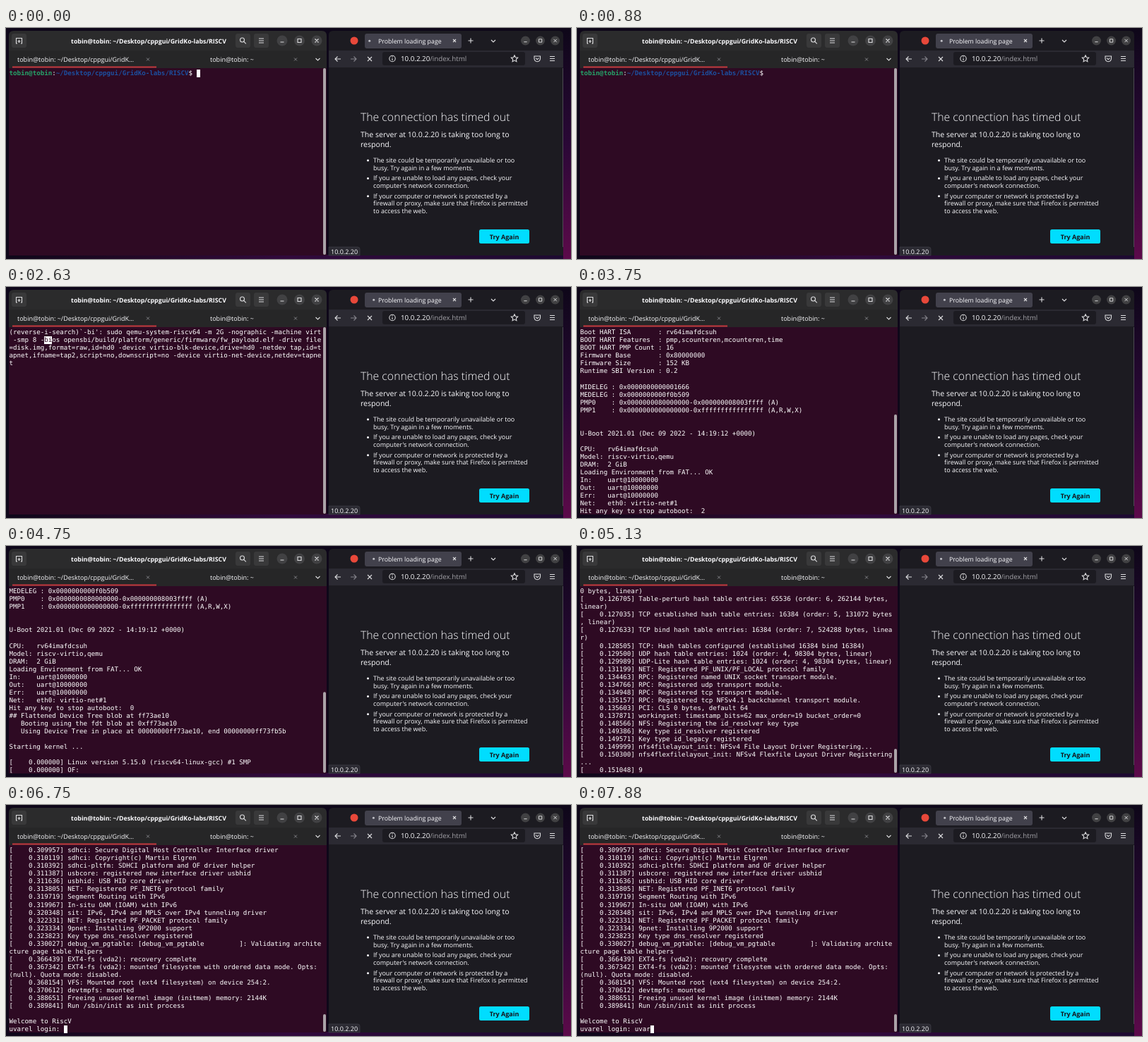
An HTML page for the animation above (8000 ms loop, 800 by 328 pixels).

```html
<!DOCTYPE html>
<html lang="en">
<head>
<meta charset="utf-8">
<title>Booting in a terminal</title>
<style>
html, body { margin: 0; width: 100%; height: 100%; overflow: hidden; background: #0e0719; }
svg, pre { position: absolute; text-rendering: geometricPrecision; }
svg { left: 0; top: 0; }
text { font: 450 9px "Open Sans", "Noto Sans", sans-serif; fill: #fbfbfe; white-space: pre; }
.b { font-weight: 700; }
.line { fill: none; stroke: #dedee0; stroke-width: 1.1; }
.dim { stroke: #8c8c90; stroke-width: .9; }
pre {
  left: 4.5px; top: 59.2px; margin: 0; color: #fff;
  font: 9.19px/11.05px "DejaVu Sans Mono", "Noto Sans Mono", monospace;
}
pre i { font-style: normal; color: #300a24; background: #fff; }
pre b { color: #26a269; }
pre b + b { color: #1d4f9f; }
</style>
</head>
<body>
<svg width="800" height="328" viewBox="0 0 800 328">
  <defs>
    <linearGradient id="floor">
      <stop offset="0" stop-color="#0e0719"/><stop offset=".25" stop-color="#240828"/>
      <stop offset=".5" stop-color="#310a3c"/><stop offset="1" stop-color="#1c0a30"/>
    </linearGradient>
    <linearGradient id="side" x2="0" y2="1">
      <stop offset="0" stop-color="#0e0719"/><stop offset=".5" stop-color="#2a0836"/>
      <stop offset="1" stop-color="#5c0a4a"/>
    </linearGradient>
    <g id="controls">
      <g fill="#414143"><circle r="7.5"/><circle cx="24.5" r="7.5"/><circle cx="49" r="7.5"/></g>
      <path class="line" d="M-2.5 2h5M22 -2.5h5v5h-5zM46.5 -2.5l5 5m0 -5l-5 5"/>
    </g>
    <path id="cross" d="M-2 -2l4 4m0 -4l-4 4"/>
    <path id="menu" d="M-3.5 -3h7m-7 3h7m-7 3h7"/>
  </defs>
  <rect y="322" width="800" height="6" fill="url(#floor)"/>
  <rect x="789" width="11" height="328" fill="url(#side)"/>

  <!-- terminal window -->
  <path d="M4 323V11q0 -7 7 -7H447q7 0 7 7V323z" fill="#2b2b2c"/>
  <path d="M4 32H454V57H4z" fill="#262627"/>
  <path d="M4 57H454V323H4z" fill="#2e0a23"/>
  <g fill="#39393a">
    <rect x="8" y="8" width="21" height="20" rx="3"/>
    <rect x="325" y="8" width="21" height="20" rx="3"/>
    <rect x="351" y="8" width="21" height="20" rx="3"/>
  </g>
  <path d="M9 54.5h204v2H9z" fill="#c5363f"/>
  <g class="line">
    <path d="M16 22h-1.5v-7.5h8v7.5h-1.5M18.5 17v4m-2 -2h4"/>
    <circle cx="334.5" cy="17" r="3"/><path d="M336.8 19.3l3 3"/>
    <use href="#menu" x="361.5" y="18"/>
    <path d="M438.5 43l3 3 3 -3"/>
  </g>
  <g class="line dim"><use href="#cross" x="201" y="44.5"/><use href="#cross" x="410" y="44.5"/></g>
  <use href="#controls" x="391" y="18"/>
  <text class="b" x="202" y="21.9" text-anchor="middle" style="font-size:8.8px">tobin@tobin: ~/Desktop/cppgui/GridKo-labs/RISCV</text>
  <text x="16" y="47.9">tobin@tobin: ~/Desktop/cppgui/GridK…</text>
  <text x="289" y="47.9">tobin@tobin: ~</text>
  <rect id="thumb" x="449" width="4" rx="2" fill="#aaa3a8"/>

  <!-- browser window -->
  <path d="M457 323V10q0 -6 6 -6H783q6 0 6 6V323z" fill="#1c1b21"/>
  <path d="M457 32H789V56H457z" fill="#2b2a32"/>
  <rect x="508" y="8" width="137" height="21" rx="3" fill="#42414c"/>
  <rect x="533" y="34" width="202" height="19" rx="3" fill="#1c1b21"/>
  <path d="M788 57h1V311h-1z" fill="#4c4b52"/>
  <circle cx="493" cy="18" r="5.5" fill="#e8483a"/>
  <circle id="dot" cy="18.3" r="1.5" fill="#c4c4ca"/>
  <text x="527" y="21.8" style="font-size:8.8px">Problem loading page</text>
  <g class="line">
    <use href="#cross" x="635" y="18"/>
    <path d="M658 14.5v7m-3.5 -3.5h7M687 17l3 3 3 -3"/>
    <path d="M474 44h-8m3.5 -3.5l-3.5 3.5 3.5 3.5"/>
    <path d="M488 44h8m-3.5 -3.5l3.5 3.5 -3.5 3.5" stroke="#85848c"/>
    <path d="M512 41l6 6m0 -6l-6 6"/>
    <circle cx="547" cy="43.5" r="4.2"/><path d="M547 43v3m0 -5.5v1.2"/>
    <path d="M720 38.8l1.4 3 3.3 .4 -2.4 2.3 .6 3.2 -2.9 -1.6 -2.9 1.6 .6 -3.2 -2.4 -2.3 3.3 -.4z"/>
    <path d="M748 40h8.5v3.5q-.5 4 -4.25 4.2q-3.75 -.2 -4.25 -4.2zM750 42.7l2.25 2 2.25 -2"/>
    <use href="#menu" x="773.5" y="43.5"/>
  </g>
  <use href="#controls" transform="translate(735.5 18) scale(.86)"/>
  <text x="559" y="47" style="font-size:9.75px">10.0.2.20<tspan fill="#a3a2a8">/index.html</tspan></text>

  <text x="502" y="131.7" style="font-size:15.8px;font-weight:350">The connection has timed out</text>
  <g id="page"></g>
  <rect x="670" y="286" width="71" height="20" rx="2.5" fill="#00ddff"/>
  <text class="b" x="705.5" y="299.5" text-anchor="middle" style="fill:#15141a">Try Again</text>
  <path d="M457 311h41q3 0 3 3v9h-44z" fill="#2b2a32" stroke="#46454e" stroke-width=".6"/>
  <text x="460" y="321">10.0.2.20</text>
</svg>
<pre id="term"></pre>

<script>
const byId = id => document.getElementById(id);

const put = (x, y, size, words) =>
  `<text x="${x}" y="${y}" style="font-size:${size}px">${words}</text>`;
const bullets = [
  ['The site could be temporarily unavailable or too', 'busy. Try again in a few moments.'],
  ['If you are unable to load any pages, check your', 'computer\'s network connection.'],
  ['If your computer or network is protected by a', 'firewall or proxy, make sure that Firefox is permitted', 'to access the web.']
];
byId('page').innerHTML =
  put(502, 155, 10.55, 'The server at 10.0.2.20 is taking too long to') +
  put(502, 168.6, 10.55, 'respond.') +
  bullets.map((lines, i) => {
    const y = 191 + 25.4 * i;
    return `<circle cx="512.5" cy="${y - 3}" r="1.5" fill="#fbfbfe"/>` +
      lines.map((words, j) => put(520, y + 10.5 * j, 9, words)).join('');
  }).join('');

const USER = 'tobin@tobin', DIR = '~/Desktop/cppgui/GridKo-labs/RISCV';
const PROMPT = USER + ':' + DIR + '$ ';
const COMMAND = 'sudo qemu-system-riscv64 -m 2G -nographic -machine virt -smp 8 ' +
  '-bios opensbi/build/platform/generic/firmware/fw_payload.elf -drive file=disk.img,format=raw,id=hd0 ' +
  '-device virtio-blk-device,drive=hd0 -netdev tap,id=tapnet,ifname=tap2,script=no,downscript=no ' +
  '-device virtio-net-device,netdev=tapnet';

const LOG = String.raw`
OpenSBI v0.8
   ____                    _____ ____ _____
  / __ \                  / ____|  _ \_   _|
 | |  | |_ __   ___ _ __ | (___ | |_) || |
 | |  | | '_ \ / _ \ '_ \ \___ \|  _ < | |
 | |__| | |_) |  __/ | | |____) | |_) || |_
  \____/| .__/ \___|_| |_|_____/|____/_____|
        | |
        |_|

Platform Name       : riscv-virtio,qemu
Platform Features   : timer,mfdeleg
Platform HART Count : 8
Current Hart        : 0
Boot HART ID        : 0
Boot HART ISA       : rv64imafdcsuh
BOOT HART Features  : pmp,scounteren,mcounteren,time
BOOT HART PMP Count : 16
Firmware Base       : 0x80000000
Firmware Size       : 152 KB
Runtime SBI Version : 0.2

MIDELEG : 0x0000000000001666
MEDELEG : 0x0000000000f0b509
PMP0    : 0x0000000080000000-0x000000008003ffff (A)
PMP1    : 0x0000000000000000-0xffffffffffffffff (A,R,W,X)


U-Boot 2021.01 (Dec 09 2022 - 14:19:12 +0000)

CPU:   rv64imafdcsuh
Model: riscv-virtio,qemu
DRAM:  2 GiB
Loading Environment from FAT... OK
In:    uart@10000000
Out:   uart@10000000
Err:   uart@10000000
Net:   eth0: virtio-net#1
Hit any key to stop autoboot:  2 
## Flattened Device Tree blob at ff73ae10
   Booting using the fdt blob at 0xff73ae10
   Using Device Tree in place at 00000000ff73ae10, end 00000000ff73fb5b

Starting kernel ...

[    0.000000] Linux version 5.15.0 (riscv64-linux-gcc) #1 SMP
[    0.000000] OF: fdt: Ignoring memory range 0x80000000 - 0x80200000
[    0.000000] Machine model: riscv-virtio,qemu
[    0.000000] efi: UEFI not found.
[    0.000000] Zone ranges:
[    0.000000]   DMA32    [mem 0x0000000080200000-0x00000000ffffffff]
[    0.000000]   Normal   empty
[    0.000000] Movable zone start for each node
[    0.000000] Early memory node ranges
[    0.000000]   node   0: [mem 0x0000000080200000-0x00000000ffffffff]
[    0.000000] SBI specification v0.2 detected
[    0.000000] SBI implementation ID=0x1 Version=0x8
[    0.000000] SBI TIME extension detected
[    0.000000] SBI IPI extension detected
[    0.000000] SBI RFENCE extension detected
[    0.000000] SBI HSM extension detected
[    0.000000] riscv: ISA extensions acdfhimsu
[    0.000000] riscv: ELF capabilities acdfim
[    0.000000] percpu: Embedded 17 pages/cpu s31912 r8192 d29528 u69632
[    0.000000] Built 1 zonelists, mobility grouping on.  Total pages: 516615
[    0.000000] Kernel command line: root=/dev/vda2 rw console=ttyS0
[    0.000000] rcu: Hierarchical RCU implementation.
[    0.000000] NR_IRQS: 64, nr_irqs: 64, preallocated irqs: 0
[    0.000000] riscv-intc: 64 local interrupts mapped
[    0.000072] sched_clock: 64 bits at 10MHz, resolution 100ns
[    0.003981] Console: colour dummy device 80x25
[    0.006219] pid_max: default: 32768 minimum: 301
[    0.031254] rcu: Hierarchical SRCU implementation.
[    0.033601] smp: Bringing up secondary CPUs ...
[    0.058442] smp: Brought up 1 node, 8 CPUs
[    0.066203] devtmpfs: initialized
[    0.074917] NET: Registered PF_NETLINK/PF_ROUTE protocol family
[    0.108261] SCSI subsystem initialized
[    0.111730] usbcore: registered new interface driver usbfs
[    0.121042] clocksource: Switched to clocksource riscv_clocksource
[    0.125381] NET: Registered PF_INET protocol family
[    0.126118] tcp_listen_portaddr_hash hash table entries: 1024 (order: 3, 40960 bytes, linear)
[    0.126705] Table-perturb hash table entries: 65536 (order: 6, 262144 bytes, linear)
[    0.127035] TCP established hash table entries: 16384 (order: 5, 131072 bytes, linear)
[    0.127633] TCP bind hash table entries: 16384 (order: 7, 524288 bytes, linear)
[    0.128505] TCP: Hash tables configured (established 16384 bind 16384)
[    0.129500] UDP hash table entries: 1024 (order: 4, 98304 bytes, linear)
[    0.129989] UDP-Lite hash table entries: 1024 (order: 4, 98304 bytes, linear)
[    0.131199] NET: Registered PF_UNIX/PF_LOCAL protocol family
[    0.134463] RPC: Registered named UNIX socket transport module.
[    0.134766] RPC: Registered udp transport module.
[    0.134948] RPC: Registered tcp transport module.
[    0.135157] RPC: Registered tcp NFSv4.1 backchannel transport module.
[    0.135603] PCI: CLS 0 bytes, default 64
[    0.137871] workingset: timestamp_bits=62 max_order=19 bucket_order=0
[    0.148566] NFS: Registering the id_resolver key type
[    0.149386] Key type id_resolver registered
[    0.149571] Key type id_legacy registered
[    0.149999] nfs4filelayout_init: NFSv4 File Layout Driver Registering...
[    0.150300] nfs4flexfilelayout_init: NFSv4 Flexfile Layout Driver Registering...
[    0.151048] 9p: Installing v9fs 9p2000 file system support
[    0.151907] NET: Registered PF_ALG protocol family
[    0.152331] Block layer SCSI generic (bsg) driver version 0.4 loaded (major 251)
[    0.152618] io scheduler mq-deadline registered
[    0.152840] io scheduler kyber registered
[    0.161452] pci-host-generic 30000000.pci: host bridge /soc/pci@30000000 ranges:
[    0.163018] pci-host-generic 30000000.pci: ECAM at [mem 0x30000000-0x3fffffff]
[    0.163944] pci_bus 0000:00: root bus resource [bus 00-ff]
[    0.216302] Serial: 8250/16550 driver, 4 ports, IRQ sharing disabled
[    0.224173] printk: console [ttyS0] disabled
[    0.227519] printk: console [ttyS0] enabled
[    0.241056] loop: module loaded
[    0.247735] virtio_blk virtio0: [vda] 4194304 512-byte logical blocks
[    0.259180]  vda: vda1 vda2
[    0.271442] e1000e: Gigabit Ethernet Network Driver
[    0.276105] ehci_hcd: USB 2.0 'Enhanced' Host Controller (EHCI) Driver
[    0.281637] ohci_hcd: USB 1.1 'Open' Host Controller (OHCI) Driver
[    0.289514] mousedev: PS/2 mouse device common for all mice
[    0.297160] goldfish_rtc 101000.rtc: registered as rtc0
[    0.306728] syscon-reboot soc:reboot: registered restart handler
[    0.309104] syscon-poweroff soc:poweroff: pm_power_off already claimed for sbi_shutdown
[    0.309295] syscon-poweroff: probe of soc:poweroff failed with error -16
[    0.309957] sdhci: Secure Digital Host Controller Interface driver
[    0.310119] sdhci: Copyright(c) Martin Elgren
[    0.310392] sdhci-pltfm: SDHCI platform and OF driver helper
[    0.311387] usbcore: registered new interface driver usbhid
[    0.311636] usbhid: USB HID core driver
[    0.313805] NET: Registered PF_INET6 protocol family
[    0.319719] Segment Routing with IPv6
[    0.319967] In-situ OAM (IOAM) with IPv6
[    0.320348] sit: IPv6, IPv4 and MPLS over IPv4 tunneling driver
[    0.322331] NET: Registered PF_PACKET protocol family
[    0.323334] 9pnet: Installing 9P2000 support
[    0.323823] Key type dns_resolver registered
[    0.330027] debug_vm_pgtable: [debug_vm_pgtable         ]: Validating architecture page table helpers
[    0.366439] EXT4-fs (vda2): recovery complete
[    0.367342] EXT4-fs (vda2): mounted filesystem with ordered data mode. Opts: (null). Quota mode: disabled.
[    0.368154] VFS: Mounted root (ext4 filesystem) on device 254:2.
[    0.370612] devtmpfs: mounted
[    0.388651] Freeing unused kernel image (initmem) memory: 2144K
[    0.389841] Run /sbin/init as init process

Welcome to RiscV
uvarel login: `;

// [ms, characters of the log shown, top of the scroll thumb]
const upTo = mark => LOG.indexOf(mark) + mark.length;
const COUNT = 'autoboot:  2', INIT = upTo('as init process\n');
const pace = [
  [2750, 0, 57], [3000, 0, 57], [3250, upTo('0.2\n'), 130], [3600, upTo(COUNT), 181],
  [4600, upTo(COUNT), 181], [4740, upTo('Starting kernel ...'), 205], [5125, upTo('0.151048] 9'), 288],
  [5750, INIT, 296.5], [6620, INIT, 296.5], [6625, LOG.length, 297], [8000, LOG.length, 297]
];
const searches = [[1250, ''], [1875, '-'], [2125, '-b'], [2375, '-bi']];
const ENTER = 2750;
const loginKeys = [7375, 7500, 7625, 7750];
const keys = [0, ...searches.map(s => s[0]), ENTER, ...loginKeys];

const wrap = text => text.split('\n').flatMap(l => l.match(/.{1,80}/g) || ['']);
const before = (list, t) => list.filter(k => k <= t);

function along(t) {
  const i = pace.findIndex(p => p[0] > t), a = pace[i - 1], b = pace[i];
  const k = (t - a[0]) / (b[0] - a[0]);
  return [Math.floor(a[1] + (b[1] - a[1]) * k), a[2] + (b[2] - a[2]) * k];
}

// \x01 and \x02 enclose inverted cells
function invert(rows, at, length) {
  const r = Math.floor(at / 80), c = at % 80, s = rows[r];
  rows[r] = s.slice(0, c) + '\x01' + s.slice(c, c + length).padEnd(length) + '\x02' + s.slice(c + length);
}

function screen(t) {
  const cursor = (t - before(keys, t).pop()) % 1200 < 600;
  const search = searches.filter(s => s[0] <= t).pop();
  let text = PROMPT, top = 57;
  if (t >= ENTER) {
    const [shown, y] = along(t);
    const left = t < 4125 ? 2 : t < 4600 ? 1 : 0;
    text += COMMAND + '\n' + LOG.slice(0, shown).replace(COUNT, 'autoboot:  ' + left) +
      'uvar'.slice(0, before(loginKeys, t).length);
    top = y;
  } else if (search) {
    text = '(reverse-i-search)`' + search[1] + "': ";
    if (search[1]) {
      // the cursor flips the first cell of the highlighted match back
      const at = text.length + COMMAND.lastIndexOf(search[1]) + cursor;
      const rows = wrap(text + COMMAND), length = search[1].length - cursor;
      if (length) invert(rows, at, length);
      return { rows, top };
    }
  }
  const rows = wrap(text).slice(-24);
  if (cursor) invert(rows, (rows.length - 1) * 80 + rows.at(-1).length % 80, 1);
  return { rows, top };
}

function draw(now) {
  const t = Math.floor(now % 8000 / 125) * 125;
  const { rows, top } = screen(t);
  byId('term').innerHTML = rows.join('\n')
    .replace(/&/g, '&amp;').replace(/</g, '&lt;')
    .replace(PROMPT, `<b>${USER}</b>:<b>${DIR}</b>$$ `)
    .replace(/\x01/g, '<i>').replace(/\x02/g, '</i>');
  byId('thumb').setAttribute('y', top);
  byId('thumb').setAttribute('height', 322 - top);
  byId('dot').setAttribute('cx', 517.7 - 3 * Math.cos(2 * Math.PI * t / 1050));
}

let start;
function tick(now) {
  start ??= now;
  draw(now - start);
  requestAnimationFrame(tick);
}
requestAnimationFrame(tick);
</script>
</body>
</html>
```
